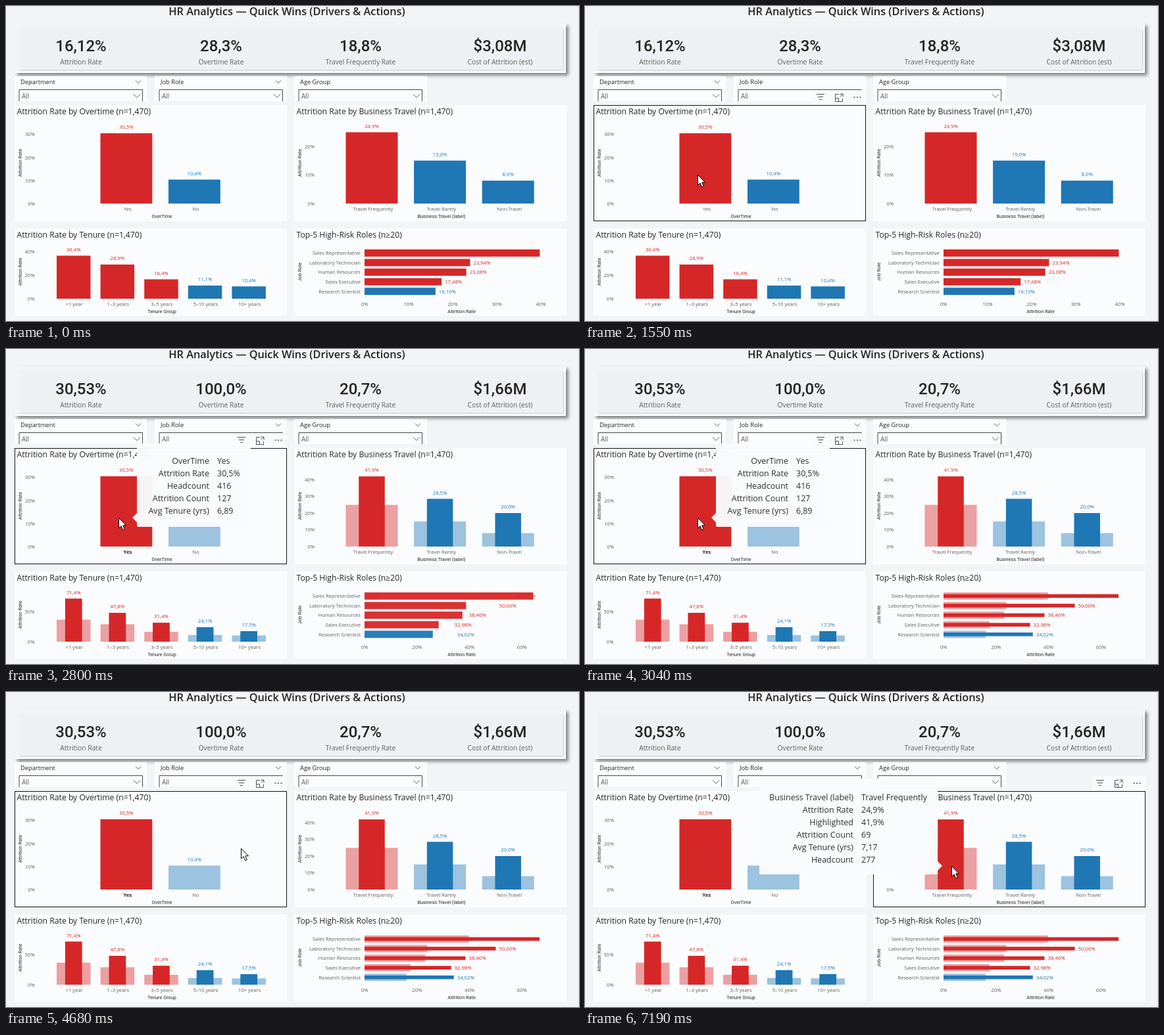
Animation of 871 by 480 pixels, one loop 8 s. Source, as an HTML page:

```html
<!DOCTYPE html>
<html lang="en">
<head>
<meta charset="utf-8">
<title>HR Analytics</title>
<style>
  html, body { margin: 0; width: 100%; height: 100%; overflow: hidden; background: #f3f4f6; }
  svg { display: block; width: 871px; height: 480px; }
  text { font-family: "Open Sans", "Noto Sans", sans-serif; }
  .din { font-family: Roboto, Arial, sans-serif; }
</style>
</head>
<body>
<svg id="stage" viewBox="0 0 871 480" xmlns="http://www.w3.org/2000/svg"></svg>
<script>
const LOOP = 8000;
const RED = '#d62728', BLUE = '#1f77b4', INK = '#252423', GREY = '#605e5c', PAPER = '#fbfcfe';
const SELECT = 2560, ROLES_START = 2720, DIM = 0.43;

// Cursor moves: first change, last change, number of steps, end point
const MOVES = [
  [500, 500, 1, 560, 463], [581, 743, 3, 470, 250], [824, 905, 2, 380, 70],
  [986, 1230, 4, 228, 186], [1310, 1550, 4, 171, 257], [3120, 3360, 4, 181, 305],
  [3530, 3610, 2, 183, 283], [3940, 3940, 1, 193, 281], [4022, 4680, 9, 357, 238],
  [4770, 4850, 2, 396, 225], [5020, 5020, 1, 398, 224], [5350, 6100, 10, 547, 244],
  [6180, 6260, 2, 557, 252], [7090, 7190, 2, 557, 265]
];

const KPI_CARD = [13, 26, 839, 77];
const PANELS = [[13, 151, 414, 177], [438, 151, 414, 177], [13, 339, 414, 133], [438, 339, 414, 133]];

const KPIS = [
  [114, 'Attrition Rate', '16,12%', '30,53%'],
  [327, 'Overtime Rate', '28,3%', '100,0%'],
  [539, 'Travel Frequently Rate', '18,8%', '20,7%'],
  [751, 'Cost of Attrition (est)', '$3,08M', '$1,66M']
];

const TRAVEL = {
  title: 'Attrition Rate by Business Travel (n=1,470)', x: 438, top: 151, base: 301, tickX: 469,
  axis: 'Business Travel (label)', names: ['Travel Frequently', 'Travel Rarely', 'Non-Travel'],
  all: [24.9, 15, 8], part: [41.9, 28.5, 20], reds: 1,
  x0: 516.5, step: 103.6, w: 79, scale: [4.36, 2.55], ticks: [[0, 10, 20], [0, 10, 20, 30, 40]], nudge: 2
};
const TENURE = {
  title: 'Attrition Rate by Tenure (n=1,470)', x: 13, top: 339, base: 446, tickX: 43.5,
  axis: 'Tenure Group', names: ['&lt;1 year', '1–3 years', '3–5 years', '5–10 years', '10+ years'],
  all: [36.4, 28.9, 16.4, 11.1, 10.4], part: [71.4, 47.8, 31.4, 24.1, 17.5], reds: 3,
  x0: 77, step: 66.6, w: 51.5, scale: [1.8, 0.92], ticks: [[0, 20, 40], [0, 50]], nudge: 1
};
const OVERTIME = {
  title: 'Attrition Rate by Overtime (n=1,470)', x: 13, top: 151, base: 301, tickX: 44,
  axis: 'OverTime', names: ['Yes', 'No'], all: [30.5, 10.4], reds: 1,
  x0: 143.5, step: 103.5, w: 78.8, scale: [3.51, 3.51], ticks: [[0, 10, 20, 30], [0, 10, 20, 30]], nudge: 2
};
const ROLES = [
  ['Sales Representative', 39.76, 66.67], ['Laboratory Technician', 23.94, 50],
  ['Human Resources', 23.08, 38.46], ['Sales Executive', 17.48, 32.98], ['Research Scientist', 16.1, 34.02]
];

const TIPS = [
  { from: 1980, to: 3280, x: 199, y: 144, w: 173, h: 127, split: 309, side: -1, rows: [
    ['OverTime', 'Yes'], ['Attrition Rate', '30,5%'], ['Headcount', '416'],
    ['Attrition Count', '127'], ['Avg Tenure (yrs)', '6,89']] },
  { from: 6680, to: LOOP, x: 265, y: 132, w: 271, h: 146, split: 408, side: 1, rows: [
    ['Business Travel (label)', 'Travel Frequently'], ['Attrition Rate', '24,9%'], ['Highlighted', '41,9%'],
    ['Attrition Count', '69'], ['Avg Tenure (yrs)', '7,17'], ['Headcount', '277']] }
];

const clamp = v => Math.max(0, Math.min(1, v));
const ease = v => v < 0.5 ? 4 * v ** 3 : 1 - 4 * (1 - v) ** 3;
const mix = (a, b, k) => a + (b - a) * k;
const comma = (v, n) => v.toFixed(n).replace('.', ',') + '%';

const rect = (x, y, w, h, fill, more = '') =>
  `<rect x="${x}" y="${y}" width="${w}" height="${h}" fill="${fill}" ${more}/>`;
const line = (d, color = GREY, w = 1) => `<path d="${d}" fill="none" stroke="${color}" stroke-width="${w}"/>`;
// y is the middle of the capitals
const text = (x, y, s, size, fill = INK, anchor = 'start', more = '') =>
  `<text x="${x}" y="${y + size * 0.36}" font-size="${size}" fill="${fill}" text-anchor="${anchor}" ${more}>${s}</text>`;
const axisName = (x, y, s, turn) =>
  text(x, y, s, 7.3, INK, 'middle', `class="din"${turn ? ` transform="rotate(-90 ${x} ${y})"` : ''}`);
const panel = ([x, y, w, h]) => rect(x, y, w, h, PAPER);
// Progress of an eased change seen in 80 ms steps
const stepped = (t, start, length) => ease(clamp(Math.floor((t - start) / 80) * 80 / length));

function cursorAt(t) {
  let pos = null;
  for (const [a, b, n, x, y] of MOVES) {
    if (t < a) break;
    const done = n === 1 ? 1 : Math.min(n, Math.floor((t - a) / (b - a) * (n - 1) + 1e-6) + 1) / n;
    pos = pos ? [mix(pos[0], x, done), mix(pos[1], y, done)] : [x, y];
  }
  return pos && pos.map(Math.round);
}

function kpiCard(t) {
  let s = rect(13, 26, 838, 76, '#f3f4f6', 'filter="url(#drop)"') +
    line('M14 101H850V27', '#fff', 2) +
    rect(20, 34, 827, 63, '#eff0f3', 'rx="2" filter="url(#soft)"');
  for (const [x, name, before, after] of KPIS)
    s += text(x, 60.5, t < 2640 ? before : after, 24, INK, 'middle', 'class="din" font-weight="500"') +
      text(x, 85, name, 10.3, GREY, 'middle');
  return s;
}

function slicer(x, name, w, arrow) {
  return rect(x, 107, w, 38, PAPER) + text(x + 9, 115.5, name, 9.3, INK, 'start', 'font-weight="500"') +
    (arrow ? line(`M${x + 184} 113.5l4 4 4 -4`) : '') +
    line(`M${x + 7} 145V127.5H${x + 194.5}V145`, '#494847') +
    text(x + 11, 137.5, 'All', 10, GREY) + line(`M${x + 181} 134.5l5 5 5 -5`);
}

function columns(c, t) {
  const crossed = !!c.part, k = crossed ? stepped(t, SELECT, 240) : 0;
  const after = crossed && t >= 2640, picked = !crossed && t >= SELECT;
  const scale = mix(...c.scale, k), end = c.scale[after ? 1 : 0];
  const midX = c.x + 224, midY = c.top === 151 ? 239 : 405;
  let s = text(c.x + 3.5, c.top + 9.5, c.title, 12.2) +
    axisName(c.x + 8, midY, 'Attrition Rate', true) +
    axisName(midX, c.top === 151 ? 320.5 : 465, c.axis);
  for (const v of c.ticks[after ? 1 : 0])
    s += text(c.tickX, c.base - v * end, v + '%', 7.7, GREY, 'end');
  c.names.forEach((name, i) => {
    const x = c.x0 + i * c.step, mid = x + c.w / 2, color = i < c.reds ? RED : BLUE;
    const h = c.all[i] * scale, opacity = picked && i ? DIM : mix(1, DIM, k);
    s += rect(x, c.base - h, c.w, h, color, `opacity="${opacity}"`);
    if (k) {
      const ph = c.part[i] * end * k;
      s += rect(x + c.w / 4, c.base - ph, c.w / 2, ph, color);
    }
    const v = after ? c.part[i] : c.all[i];
    s += text(mid, c.base - v * end - 9.5, comma(v, 1), 7.8, color, 'middle') +
      text(mid + c.nudge, c.base + 8.5, name, 7.6, picked && !i ? INK : GREY, 'middle',
        picked && !i ? 'font-weight="700"' : '');
  });
  return s;
}

function roles(t) {
  const after = t >= ROLES_START, k = stepped(t, ROLES_START, 280);
  const scale = mix(6.7, 3.99, k), end = after ? 3.99 : 6.7;
  let s = text(441.5, 348.5, 'Top-5 High-Risk Roles (n≥20)', 12.2) +
    axisName(446, 405, 'Job Role', true) + axisName(692.5, 465, 'Attrition Rate');
  for (const v of after ? [0, 20, 40, 60] : [0, 10, 20, 30, 40])
    s += text(545 + v * end, 454.5, v + '%', 7.7, GREY, 'middle');
  ROLES.forEach(([name, all, part], i) => {
    const y = 376.4 + i * 14.6, color = i < 4 ? RED : BLUE, v = after ? part : all;
    const tip = 545 + v * end;
    s += text(539, y, name, 7.6, GREY, 'end') +
      rect(545, y - 5.5, all * scale, 11, color, `opacity="${mix(1, DIM, k)}"`);
    if (k) s += rect(545, y - 2.8, part * end * k, 5.6, color, `opacity="${k}"`);
    // The longest bar has its label inside
    s += i ? text(tip + 5, y, comma(v, 2), 7.8, color) : text(tip - 6, y, comma(v, 2), 7.8, color, 'end');
  });
  return s;
}

function toolbar([x, y, w]) {
  const r = x + w, m = y - 12;
  return rect(r - 81, y - 23, 81, 22, '#f9fafb') +
    line(`M${r - 75} ${m - 4.5}h12m-10 4h8m-6 4h4`, '#555') +
    line(`M${r - 41} ${m - 4.5}h-5.5v11h11v-5M${r - 39.5} ${m - 5}h4.5v4.5m0 -4.5l-4.5 4.5` +
      `M${r - 46.5} ${m + 1.5}h5v5`, '#555') +
    [-17.5, -13, -8.5].map(d => `<circle cx="${r + d}" cy="${m}" r="1.1" fill="#555"/>`).join('');
}

function tooltip(tip, [, cy]) {
  const dy = tip.side > 0 ? cy - 265 : 0, y = tip.y + dy;
  const edge = tip.side > 0 ? tip.x + tip.w : tip.x, py = (tip.side > 0 ? 265 : 257) + dy;
  let s = `<g fill="#fafbfd" opacity="0.97">` + rect(tip.x, y, tip.w, tip.h, '#fafbfd', 'rx="2"') +
    `<path d="M${edge} ${py - 7}l${7 * tip.side} 7l${-7 * tip.side} 7z"/></g>`;
  tip.rows.forEach(([name, value], i) => {
    const ty = y + (tip.side > 0 ? 28 : 26.5) + i * 19;
    s += text(tip.split, ty, name, 12.5, '#2d2c35', 'end') + text(tip.split + 12, ty, value, 12.5, '#2d2c35');
  });
  return s;
}

const DEFS = `<defs>
  <filter id="drop" x="-5%" y="-20%" width="110%" height="150%">
    <feDropShadow dx="4" dy="4" stdDeviation="2.8" flood-color="#000" flood-opacity=".45"/></filter>
  <filter id="soft" x="-5%" y="-20%" width="110%" height="150%">
    <feDropShadow dx="1" dy="1" stdDeviation="1" flood-color="#000" flood-opacity=".16"/></filter>
</defs>`;

function scene(t) {
  const cur = cursorAt(t);
  const hover = cur && [KPI_CARD, ...PANELS].find(([x, y, w, h]) =>
    cur[0] >= x && cur[0] < x + w && cur[1] >= y && cur[1] < y + h);
  let s = DEFS + rect(0, 0, 871, 480, '#f3f4f6') + rect(869, 0, 1, 480, '#e6e7ea') +
    text(427, 8.5, 'HR Analytics — Quick Wins (Drivers &amp; Actions)', 16.3, INK, 'middle', 'font-weight="600"') +
    kpiCard(t) +
    slicer(13, 'Department', 201, true) +
    slicer(226, 'Job Role', 201, t < 1150 || t >= SELECT) +
    slicer(438, 'Age Group', 202, t >= SELECT) +
    PANELS.map(panel).join('') +
    columns(OVERTIME, t) + columns(TRAVEL, t) + columns(TENURE, t) + roles(t);
  if (hover) {
    const [x, y, w, h] = hover;
    s += toolbar(hover) + rect(x + 0.5, y + 0.5, w - 1, h - 1, 'none', 'stroke="#161616"');
  }
  for (const tip of TIPS) if (t >= tip.from && t < tip.to) s += tooltip(tip, cur);
  if (t >= 2310 && t < 2390) s += `<circle cx="171" cy="257" r="11.5" fill="#fff" opacity=".22"/>`;
  if (cur) s += `<path transform="translate(${cur[0] + 0.5} ${cur[1] + 0.5})"
    d="M0 0V15.5L3.6 12.2L6.2 18.3L8.8 17.2L6.3 11.3H11Z" fill="#fff" stroke="#000"/>`;
  return s;
}

const stage = document.getElementById('stage');
const start = performance.now();
let shown = '';
function draw() {
  const next = scene((performance.now() - start) % LOOP);
  if (next !== shown) stage.innerHTML = shown = next;
  requestAnimationFrame(draw);
}
draw();
</script>
</body>
</html>
```
